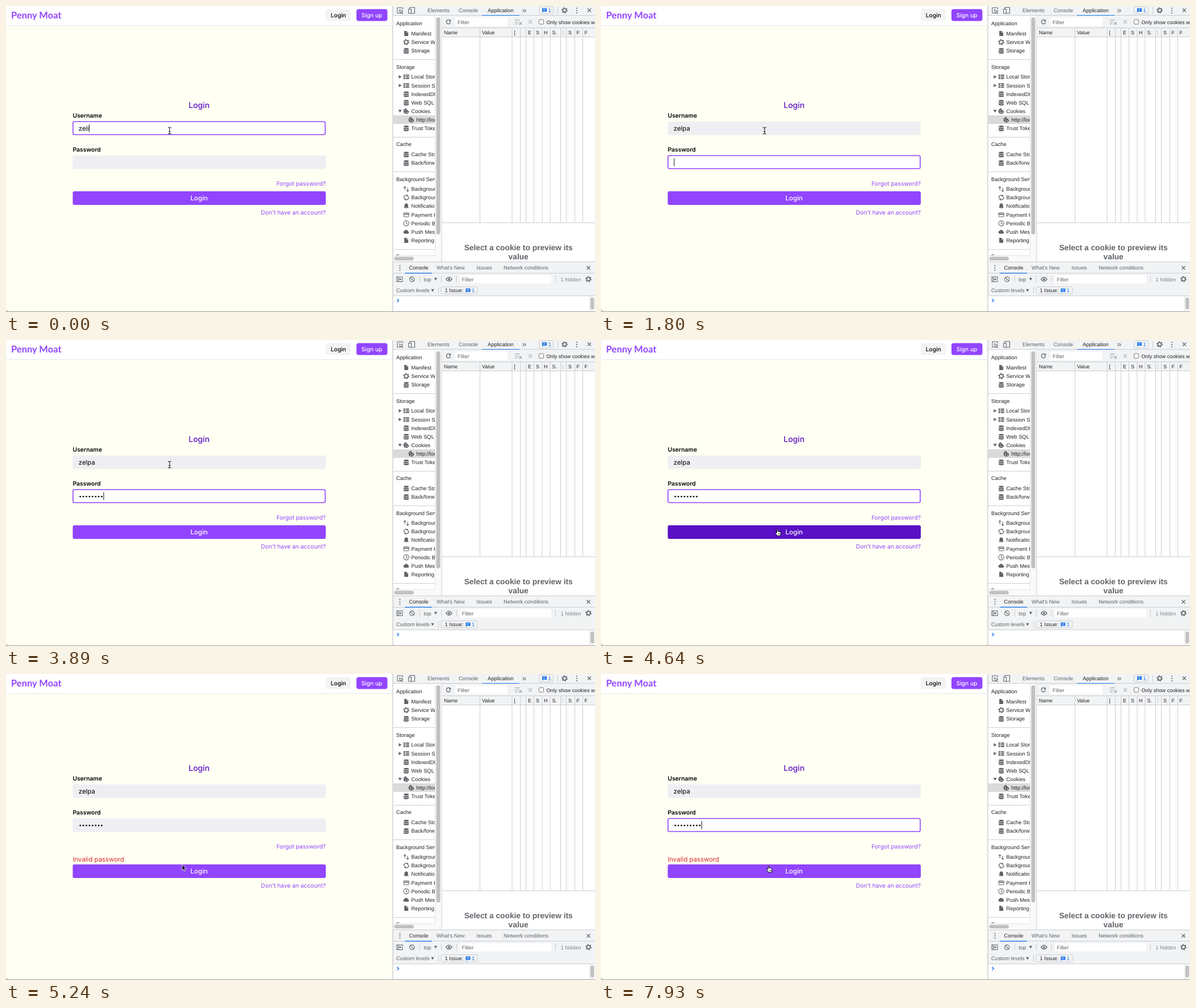
An HTML page that plays this animation: 1037x540 px, repeating every 8 s.

```html
<!DOCTYPE html>
<html lang="en">
<head>
<meta charset="utf-8">
<title>Login</title>
<style>
html, body { margin: 0; width: 100%; height: 100%; overflow: hidden; background: #fff; }
svg { display: block; font: 9.35px "Liberation Sans", Arial, sans-serif; text-rendering: geometricPrecision; }
.page { font-family: Inter, Roboto, sans-serif; }
</style>
</head>
<body>
<svg id="stage" width="1037" height="540" viewBox="0 0 1037 540"></svg>
<script>
const PURPLE = '#9145ff', DEEP = '#5a10c4', INK = '#222326', ICON = '#5f6368', BAR = '#f1f3f4', LINE = '#cbcdd1', BLUE = '#1a73e8';

const rect = (x, y, w, h, fill, more = '') => `<rect x="${x}" y="${y}" width="${w}" height="${h}" fill="${fill}" ${more}/>`;
const text = (s, x, y, more = '') => `<text x="${x}" y="${y}" ${more}>${s}</text>`;
const path = (d, more = '') => `<path d="${d}" ${more}/>`;
const hline = (x, y, w, c = LINE) => rect(x, y, w, 1, c);
const vline = (x, y, h, c = LINE) => rect(x, y, 1, h, c);
const at = (x, y, s) => `<g transform="translate(${x} ${y})">${s}</g>`;
const stroke = (c = ICON, w = 1.1) => `fill="none" stroke="${c}" stroke-width="${w}"`;
const cross = (x, y, r = 3, c = ICON) => at(x, y, path(`M${-r} ${-r}L${r} ${r}M${r} ${-r}L${-r} ${r}`, stroke(c, 1.2)));
const dots = (x, y) => at(x, y, [-4, 0, 4].map(d => `<circle cy="${d}" r="1.1" fill="${ICON}"/>`).join(''));

// Icons are drawn around their own centre.
const icon = {
  doc: path('M-3.5-4.5H1L3.5-2V4.5H-3.5Z', `fill="${ICON}"`) + path('M1-4.5V-2H3.5', stroke('#fff', .8)),
  gear: `<circle r="3.2" ${stroke(ICON, 1.6)}/><circle r="4.6" ${stroke(ICON, 1.5)} stroke-dasharray="2 2.82"/>`,
  db: [-3.3, 0, 3.3].map(y => `<ellipse cy="${y}" rx="4.4" ry="1.4" fill="${ICON}"/>`).join('') +
    path('M-4.4-2V4.2Q0 6 4.4 4.2V-2', `fill="${ICON}"`) + path('M-4.4-1.6Q0 .2 4.4-1.6M-4.4 1.6Q0 3.4 4.4 1.6', stroke('#fff', .8)),
  grid: rect(-5, -4, 10, 8, ICON) + path('M-5-1.4H5M-5 1.4H5M-1-4V4', stroke('#fff', .9)),
  cookie: path('M0-5A5 5 0 1 0 5 0Q2.5.5 2.5-2Q0-2 0-5Z', `fill="${ICON}"`) +
    [[-2, -1], [-1, 2.4], [2, 2]].map(([x, y]) => `<circle cx="${x}" cy="${y}" r=".8" fill="#fff"/>`).join(''),
  arrows: path('M-2.5 2V-4M-4.5-2L-2.5-4.3L-.5-2M2.5-2V4M.5 2L2.5 4.3L4.5 2', stroke()),
  sync: path('M-3.8 1.5A4 4 0 0 1 2.5-3.1M3.8-1.5A4 4 0 0 1-2.5 3.1', stroke(ICON, 1.3)) + path('M1-5.2L4-3L1-1ZM-1 5.2L-4 3L-1 1Z', `fill="${ICON}"`),
  bell: path('M-4.5 3.2L-3.2 1.8V-1Q-3.2-4 0-4.8Q3.2-4 3.2-1V1.8L4.5 3.2ZM-1.2 4H1.2Q0 5.6-1.2 4Z', `fill="${ICON}"`),
  card: rect(-4.5, -3.6, 9, 7.2, 'none', `rx=".8" stroke="${ICON}"`) + rect(-4.5, -2, 9, 1.9, ICON),
  clock: `<circle r="4.6" ${stroke()}/>` + path('M0-3V.3L2.2 1.8', stroke()),
  cloud: path('M-3 3.3A2.6 2.6 0 0 1-2.9-1.8A3.2 3.2 0 0 1 3-1A2.2 2.2 0 0 1 3 3.3Z', `fill="${ICON}"`)
};
const chat = (x, y) => at(x, y, path('M-4-3.6H4V2.4H-2L-4 4.2Z', `fill="${BLUE}"`) + path('M-2.2-1.6H2.2M-2.2.6H1', stroke('#fff', .8)));
const reload = (x, y) => at(x, y, path('M3-2.4A3.7 3.7 0 1 0 3.6 1', stroke(ICON, 1.3)) + path('M4.2-4.6V-.6H.4Z', `fill="${ICON}"`));

const sections = [['Application', 31], ['Storage', 107.5], ['Cache', 244], ['Background Services', 305.5], ['Frames', 442]];
const items = [
  ['doc', 'Manifest', 48.5], ['gear', 'Service Workers', 63.7], ['db', 'Storage', 79],
  ['grid', 'Local Storage', 125], ['grid', 'Session Storage', 140.3], ['db', 'IndexedDB', 155.5], ['db', 'Web SQL', 170.5],
  ['cookie', 'Cookies', 185.5], ['cookie', 'http://localhost', 200.7, 9], ['db', 'Trust Tokens', 215.8],
  ['db', 'Cache Storage', 262], ['db', 'Back/forward cache', 277],
  ['arrows', 'Background Fetch', 323], ['sync', 'Background Sync', 338], ['bell', 'Notifications', 353],
  ['card', 'Payment Handler', 368.4], ['clock', 'Periodic Background Sync', 383.5], ['cloud', 'Push Messaging', 398.5], ['doc', 'Reporting API', 413.5]
];

function sidebar() {
  return `<clipPath id="side"><path d="M682 17H755.5V440H682Z"/></clipPath><g clip-path="url(#side)" fill="${INK}">` +
    rect(682, 193, 74, 15, '#dadada') +
    sections.map(([s, y]) => text(s, 687, y + 3.4)).join('') +
    items.map(([k, s, y, dx = 0]) => at(704.7 + dx, y, icon[k]) + text(s, 713.5 + dx, y + 3.4)).join('') +
    [125, 140.3].map(y => path(`M691.5 ${y - 3}L696.5 ${y}L691.5 ${y + 3}Z`, `fill="${ICON}"`)).join('') +
    path('M690.5 183.3H696.9L693.7 188Z', `fill="${ICON}"`) +
    [94, 231, 292, 429].map(y => hline(682, y, 74, '#d0d0d0')).join('') + '</g>' +
    rect(755.5, 17, 11, 434, '#fafafa') + vline(755, 17, 434, '#e4e4e4') + rect(757.5, 20, 7, 383, '#c1c1c1', 'rx="3.5"') +
    rect(682, 440.5, 74, 10.5, '#fafafa') + hline(682, 440, 74, '#e4e4e4') + rect(683.5, 442.5, 34.5, 6.5, '#c1c1c1', 'rx="3.2"') +
    vline(766.5, 17, 434);
}

function cookieTable() {
  const cols = [834, 890.5, 905, 915, 929, 943.5, 957.5, 976, 986, 1001, 1015];
  const heads = [['Name', 771], ['Value', 838], ['[', 894.5], ['E', 919], ['S', 933], ['H', 947], ['S.', 961.5], [':', 979], ['S', 990], ['F', 1004.5], ['F', 1018.5]];
  return rect(767.5, 17, 270, 21, BAR) + rect(767.5, 39, 270, 15, BAR) + hline(767, 38, 270) + hline(767, 54, 270) +
    cols.map(x => vline(x, 39, 343)).join('') + heads.map(([s, x]) => text(s, x, 50.4, 'font-size="9"')).join('') +
    reload(779, 28) + rect(791, 20.5, 92, 15, '#fff') + text('Filter', 795, 31.8, `fill="${ICON}"`) +
    path('M896 24.5H905M896 28H902M896 31.5H901M903.5 28.5L908 33M908 28.5L903.5 33', stroke('#9aa0a6')) + cross(923, 28, 3, '#b4b8bc') +
    rect(938.5, 24, 8, 8, '#fff', 'rx="1.5" stroke="#767676"') + text('Only show cookies with an issue', 951.5, 31.6, 'font-size="9.15"') +
    hline(767, 382, 270) +
    `<g font-size="13.75" font-weight="700" text-anchor="middle" fill="${ICON}">` +
    text('Select a cookie to preview its', 902.2, 430.5) + text('value', 902.2, 447) + '</g>';
}

function topTabs() {
  return rect(681, 0, 356, 16, BAR) + hline(681, 16, 356) +
    path('M696 12.5H689V3H698.5V6M692.5 6.5L699 9L696.3 10L699 13L698 13.8L695.5 11L694.5 13Z', stroke(ICON, 1)) +
    path('M711 5V2.5H719.5V13H714M708.8 5.5H713.5V13H708.8Z', stroke(ICON, 1.1)) +
    text('Elements', 742, 11.2, `fill="${ICON}"`) + text('Console', 797, 11.2, `fill="${ICON}"`) + text('Application', 848, 11.2) +
    rect(838, 16, 66, 1.2, BLUE) + text('»', 908.5, 11.8, `font-size="14" fill="${ICON}"`) +
    rect(938.5, 1.5, 25, 12.5, BAR, `rx="2" stroke="${LINE}"`) + chat(948, 7.5) + text('1', 954.5, 11, `fill="${BLUE}"`) +
    vline(971, 2, 12) + at(983.5, 7.7, icon.gear) + dots(1005, 8) + cross(1027, 7.5);
}

function drawer() {
  const arrow = (x, y) => path(`M${x - 2.6} ${y - 2.3}H${x + 2.6}L${x} ${y + 2.4}Z`, `fill="${ICON}"`);
  return rect(681, 451, 356, 60, BAR) + [451, 471, 511].map(y => hline(681, y, 356)).join('') +
    dots(693.5, 462) + text('Console', 709.5, 465.3) + rect(702.5, 470.8, 47.5, 1.4, BLUE) +
    `<g fill="${ICON}">` + text("What's New", 758, 465.3) + text('Issues', 828.5, 465.3) + text('Network conditions', 876, 465.3) + '</g>' + cross(1025.5, 462) +
    rect(688, 478, 10, 8.5, 'none', `stroke="${ICON}"`) + path('M690.5 478V486.5', stroke()) + path('M692.5 480L696.5 482.2L692.5 484.5Z', `fill="${ICON}"`) +
    at(714.8, 482.3, `<circle r="4.2" ${stroke()}/>` + path('M-3-3L3 3', stroke())) + vline(728, 476, 12) +
    text('top', 735.5, 485.5, `fill="${ICON}"`) + arrow(756.5, 482) + vline(766, 476, 12) +
    at(780, 482.2, path('M-5.2 0Q0-7 5.2 0Q0 7-5.2 0Z', stroke(ICON, 1.2)) + `<circle r="1.8" fill="${ICON}"/>`) + vline(793, 476, 12) +
    rect(799, 475, 161, 14.5, '#fff') + text('Filter', 802.5, 485.7, `fill="${ICON}"`) + vline(967, 476, 12) +
    text('1 hidden', 976.5, 485.5, 'fill="#80868b"') + at(1025.5, 482, icon.gear) +
    text('Custom levels', 687, 505.2, `fill="${ICON}"`) + arrow(751, 502) + vline(761, 496, 12) +
    rect(766, 495.5, 64, 12.5, BAR, `rx="2" stroke="${LINE}"`) + text('1 Issue:', 772.5, 505.2) + chat(813.5, 502) + text('1', 820, 505.2, `fill="${BLUE}"`) +
    path('M688.5 517L691.5 519.8L688.5 522.6', stroke(BLUE, 1.4)) +
    rect(1027.5, 512, 9.5, 27, '#fafafa') + vline(1027, 512, 27, '#e4e4e4') + rect(1029, 514.5, 6.5, 21, '#c1c1c1', 'rx="3.2"');
}

function pageFrame() {
  return rect(0, 0, 680, 540, '#fffff3') + rect(0, 0, 680, 34, '#fff') + hline(0, 34, 680, '#e5e7eb') +
    text('Penny Moat', 9, 21.6, `font-size="16.5" font-weight="700" fill="${PURPLE}" style="font-family:Lato,sans-serif"`) +
    `<g class="page" font-size="10.2" font-weight="500" text-anchor="middle">` +
    rect(563, 5.5, 44, 21, '#f3f3f4', 'rx="4"') + text('Login', 585.3, 19.5) +
    rect(617, 5.5, 54.5, 21, PURPLE, 'rx="4"') + text('Sign up', 644, 19.5, 'fill="#fff"') + '</g>';
}

const stage = document.getElementById('stage');
stage.innerHTML = rect(0, 0, 1037, 540, '#fff') + pageFrame() + '<g id="form" class="page"></g>' +
  `<g fill="${INK}">` + topTabs() + sidebar() + cookieTable() + drawer() + '</g>' + vline(680.5, 0, 540, '#b9b9b9') +
  rect(0, 538.6, 1037, 1.4, '#b5b5b5') + path('M0 533Q0 539 6 539L0 540Z', 'fill="#b5b5b5"') + '<g id="pointer"></g>';
const form = document.getElementById('form'), pointer = document.getElementById('pointer');

const pointers = {
  beam: path('M-3-6Q0-6 0-4Q0-6 3-6M0-5V5M-3 6Q0 6 0 4Q0 6 3 6M-1.5 1.5H1.5', stroke('#111', 1)),
  arrow: path('M0 0V10L2.3 7.9L3.9 11.5L5.6 10.7L4 7.3H7.2Z', 'fill="#000" stroke="#fff" stroke-width=".8"'),
  hand: path('M-2.5 1V-4.8Q-1.6-6.3-.7-4.8V-1.5Q.4-2.4 1.2-1.2Q2.3-1.9 3-.7Q4.4-1.2 4.7.4V3L3.6 6H-1.6L-4.8 1.6Q-4.6.1-3.3.6Z', 'fill="#fff" stroke="#000" stroke-width="1"') +
    path('M.2 1.5V4.2M1.7 1.5V4.2M3.1 1.5V4.2', stroke('#000', .6))
};

// Each step changes only the listed properties.
const steps = [
  [0, { name: 'zeli', focus: 'name', caret: 4, pass: 0, kind: 'beam', x: 288, y: 220, hover: false, error: false }],
  [150, { name: 'zelip', caret: 5 }], [600, { name: 'zeli', caret: 4 }], [750, { name: 'zel', caret: 3 }],
  [1050, { caret: -1 }], [1350, { name: 'zelpa', caret: 5 }], [1800, { focus: 'pass', caret: 0 }],
  ...[[2400, 1], [2550, 2], [2840, 3], [3140, 4], [3440, 5], [3590, 7], [3890, 8]].map(([t, n]) => [t, { pass: n, caret: n }]),
  [4340, { caret: -1, x: 292, y: 240 }], [4490, { kind: 'arrow', x: 305, y: 308 }],
  [4640, { kind: 'hand', x: 312, y: 339.5, hover: true }], [4790, { focus: '' }],
  [5090, { error: true }], [5240, { kind: 'arrow', x: 310, y: 336.5, hover: false }],
  ...[5390, 5540, 5690, 5830, 5980, 6130].map((t, i) => {
    const k = 1 - (1 - (i + 1) / 6) ** 2, y = 336.5 - 77.5 * k;
    return [t, { kind: y < 279 ? 'beam' : 'arrow', x: 310 - 35.5 * k, y }];
  }),
  [6730, { focus: 'pass', caret: 0 }], [7030, { caret: 8, kind: '' }], [7330, { caret: -1 }],
  [7630, { pass: 9, caret: 9 }], [7780, { kind: 'arrow', x: 286, y: 308 }], [7930, { kind: 'hand', x: 296.5, y: 344 }]
];

function field(y, label, focused) {
  return text(label, 117.5, y - 7, 'font-size="10.4" font-weight="600"') + (focused
    ? rect(118, y + .3, 444, 23, '#fff', `rx="2.5" stroke="${PURPLE}" stroke-width="1.6"`)
    : rect(117.5, y, 445.5, 24, '#efeef2', 'rx="3"'));
}

function drawForm(s) {
  const up = s.error ? -9 : 0, down = -up, nameY = 203.7 + up, passY = 263.7 + up;
  const link = `font-size="10.27" text-anchor="end" fill="${PURPLE}"`;
  let passDots = '';
  for (let i = 0; i < s.pass; i++) passDots += `<circle cx="${130.8 + 5.4 * i}" cy="${passY + 12.6}" r="1.4"/>`;
  form.innerHTML =
    text('Login', 340, 180.3 + up, `font-size="14" font-weight="500" text-anchor="middle" fill="${DEEP}"`) +
    field(nameY, 'Username', s.focus === 'name') + text(s.name, 127.8, nameY + 16.1, 'id="name" font-size="11.4"') +
    field(passY, 'Password', s.focus === 'pass') + passDots +
    text('Forgot password?', 563, 317 + up, link) +
    (s.error ? text('Invalid password', 117.5, 331.2, 'font-size="11.4" fill="#dc2626"') : '') +
    rect(117.5, 327 + down, 445.5, 24, s.hover ? DEEP : PURPLE, 'rx="3"') +
    text('Login', 340, 343.2 + down, 'font-size="11.6" font-weight="500" text-anchor="middle" fill="#fff"') +
    text("Don't have an account?", 563, 368.3 + down, link);
  if (s.caret < 0 || !s.focus) return;
  const onName = s.focus === 'name';
  const x = onName ? 128 + document.getElementById('name').getComputedTextLength() : 128.3 + 5.4 * s.caret;
  form.innerHTML += rect(x, (onName ? nameY : passY) + 5, 1, 14, '#111');
}

let shown = -1;
function tick(now) {
  const t = now % 8000, count = steps.filter(([start]) => start <= t).length;
  if (count !== shown) {
    shown = count;
    const s = Object.assign({}, ...steps.slice(0, count).map(step => step[1]));
    drawForm(s);
    pointer.innerHTML = s.kind ? at(s.x, s.y, pointers[s.kind]) : '';
  }
  requestAnimationFrame(tick);
}
tick(0);
</script>
</body>
</html>
```
